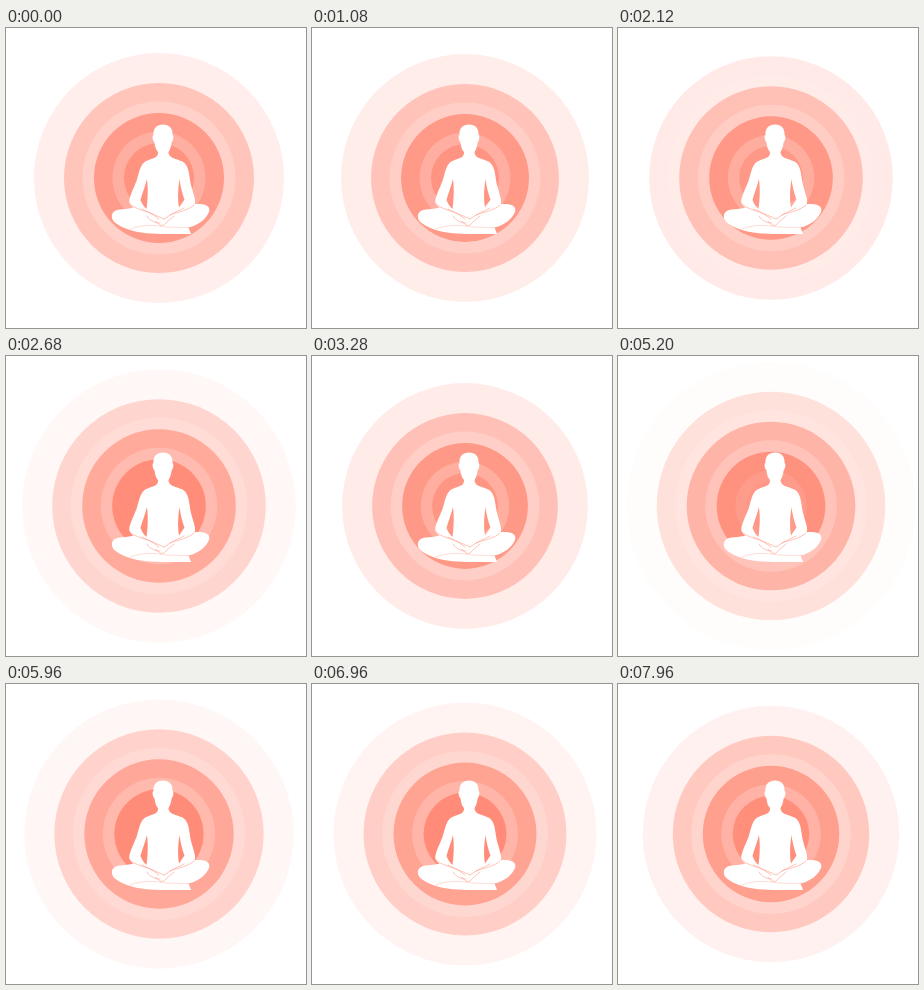
Recreate the animation shown at these times as an HTML page. Size 300 by 300 pixels, loop 8 s.

```html
<!DOCTYPE html>
<html lang="en">
<head>
<meta charset="utf-8">
<title>Meditation ripples</title>
<style>
  html, body { margin: 0; width: 100%; height: 100%; overflow: hidden; background: #fff; }
  svg { display: block; width: 100vw; height: 100vh; }
</style>
</head>
<body>
<svg viewBox="0 0 300 300">
  <g id="ripples"></g>
  <g fill="#fff">
    <!-- head and neck -->
    <path d="M147.5 107 C147 100 151 96.5 157 96.5 C163 96.5 167 100 166.5 107
      C168 107 167.5 113 165.7 114 C165 119 164 122 162.5 124 L163 132 H151.5 L152 124
      C150 122 149 119 148.4 114 C146.5 113 146 107 147.5 107 Z"/>
    <!-- torso and arms, with the gaps at the waist -->
    <path fill-rule="evenodd" d="M152 126 C151 131 142 131 138 134.5 C134 138 133 145 130.5 153
      C127 162 122 171 123.5 175 C125 180 134 184 142 189 L154 195 L172 189
      C180 184 188 180 189 175 C190 170 185 160 184 152 C183 144 182 138 178 134.5
      C173 131 164 131 163 126 Z
      M141 151 C139 159 136 166 134.5 172 C136 176 138 179 140.5 181 C141.5 174 142.5 162 141 151 Z
      M173.5 151 C174.5 160 177 167 178.5 171.5 L173 179.5 C171.5 171 172 160 173.5 151 Z"/>
    <!-- crossed legs -->
    <path d="M126 180 C118 182 108 180 106 186.5 C104.5 193 111 197 121 201
      C133 205.5 148 206 160 206 H185 L182.5 199.5 C193 197 200 191 203 184
      C205 178 199 175.5 190 176 C180 177 172 181 165 185 H147 C140 182 134 179 126 180 Z"/>
  </g>
  <g fill="none" stroke="#ff9d8b" stroke-width=".6" stroke-linecap="round">
    <path d="M124 176 C128 181 141 183 149 187 L158 191 M136 181 C143 184 149 188 153 191"/>
    <path d="M188 177 C183 182 173 184 166 186 L158 191 M178 180 L164 187"/>
    <path d="M141 188 C144 193 149 195 154 195 M150 193 C153 198 157 199 160 195 C163 192 166 190 168 188"/>
    <path d="M124 201 C134 197 144 197 153 198 C164 200 173 199 183 199.5" stroke-opacity=".6"/>
  </g>
</svg>
<script>
const PERIOD = 1120, SPACING = 30, RIM = 11.5, COUNT = 5;
const CENTER = { cx: 153, cy: 150 };
const layer = document.getElementById('ripples');
const clamp = x => Math.min(1, Math.max(0, x));

function addCircle() {
  const circle = document.createElementNS('http://www.w3.org/2000/svg', 'circle');
  for (const name in CENTER) circle.setAttribute(name, CENTER[name]);
  return layer.appendChild(circle);
}

function paint(circle, radius, fill, opacity) {
  circle.setAttribute('r', radius);
  circle.setAttribute('fill', fill);
  circle.setAttribute('fill-opacity', opacity);
}

// Coral near the middle, easing to white at the edge.
function discColor(radius) {
  const white = (1 - Math.cos(Math.PI * clamp((radius - 35) / 120))) / 2;
  const mix = channel => Math.round(channel + (255 - channel) * white);
  return `rgb(255,${mix(138)},${mix(118)})`;
}

// Largest first, so that smaller discs lie on top.
const ripples = Array.from({ length: COUNT }, (_, i) => ({
  index: COUNT - 1 - i, rim: addCircle(), disc: addCircle()
}));

function draw(now) {
  const phase = (now % 8000) % PERIOD / PERIOD;
  for (const { index, rim, disc } of ripples) {
    const radius = 5 + SPACING * (index + phase);
    const rimOpacity = 0.2 * clamp((radius - 20) / 10) * clamp((95 - radius) / 25);
    paint(rim, radius + RIM, '#fff', rimOpacity);

    // A young disc takes on the colour of the one around it until it emerges.
    const emerged = clamp((radius - 32) / 10);
    const own = radius < 42 ? discColor(radius + SPACING * (1 - emerged)) : discColor(radius);
    paint(disc, radius, own, clamp((radius - 20) / 10));
  }
}

const start = performance.now();
function tick() {
  draw(performance.now() - start);
  requestAnimationFrame(tick);
}
tick();
</script>
</body>
</html>
```
